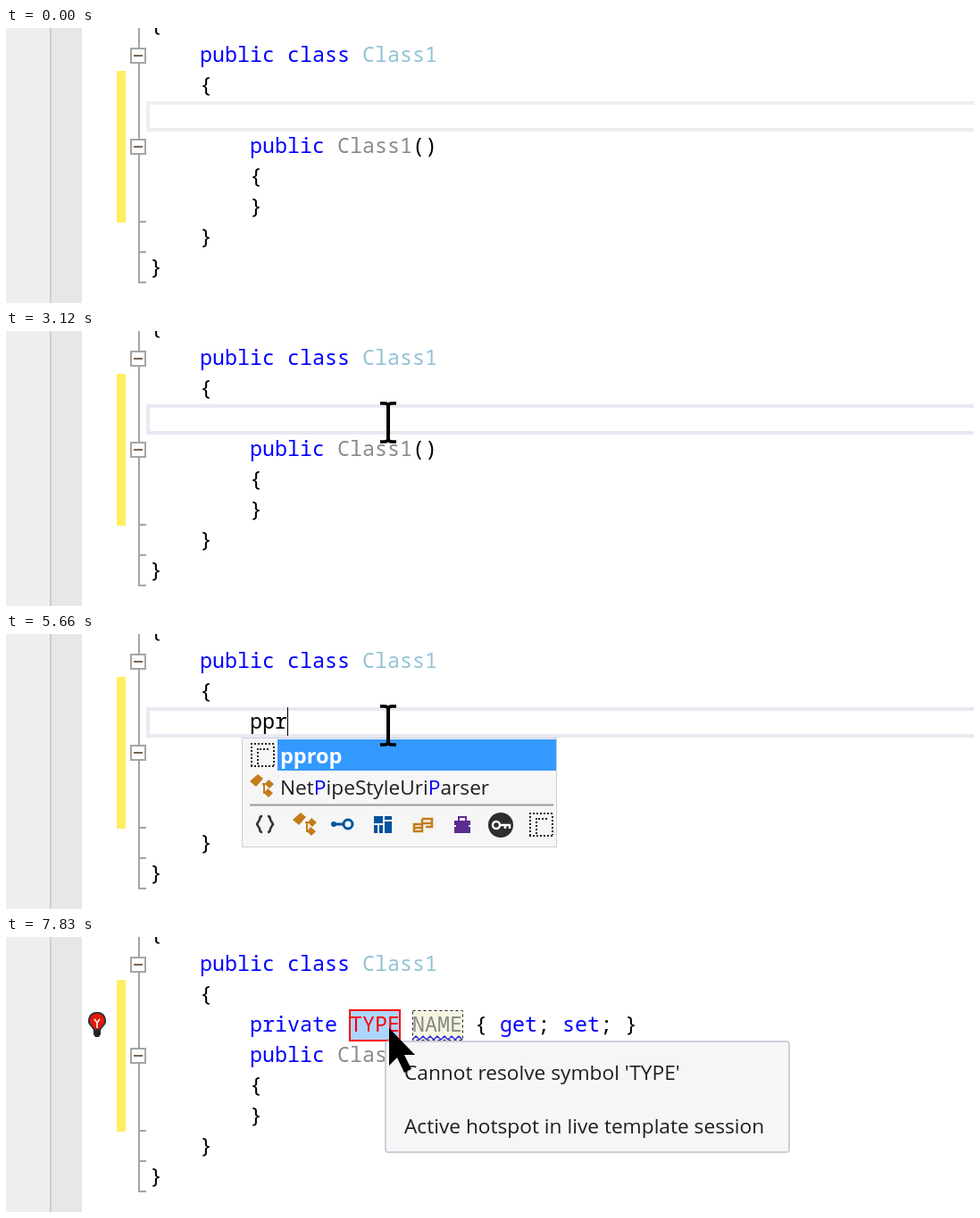
Animation, 1084 px wide and 308 px high, one loop 8000 ms. Source, as an HTML page:

```html
<!DOCTYPE html>
<html lang="en">
<head>
<meta charset="utf-8">
<title>Property template</title>
<style>
  html, body { margin: 0; width: 100%; height: 100%; overflow: hidden; background: #fff; }
  svg { display: block; width: 1084px; height: 308px; }
  text { white-space: pre; }
  .code { font: 23.33px "Noto Sans Mono", "DejaVu Sans Mono", monospace; }
  .ui { font: 22.7px "Open Sans", "Noto Sans", sans-serif; fill: #1e1e1e; }
  .pick { font-weight: 700; font-size: 23.5px; fill: #fff; }
  .kw { fill: #00f; }
  .type { fill: #93c2d6; }
  .dim { fill: #8a8a8a; }
  .in { fill: #717171; }
  .panel { fill: #f6f6f6; stroke: #cccedb; }
</style>
</head>
<body>
<svg viewBox="0 0 1084 308">
  <defs>
    <g id="snippet" fill="none" stroke="#222" stroke-width="2" stroke-dasharray="2 2">
      <path d="M0 1H27M0 26H27M1 4V25M26 4V25M8 6V24M10 7H20"/>
    </g>
    <g id="nodes" fill="#c27d1a">
      <path d="M14 11H20M16 11V21H20" fill="none" stroke="#c27d1a" stroke-width="2"/>
      <path d="M21 6L27 11L22 16L17 11ZM20 16L26 21L21 26L16 21Z"/>
    </g>
    <g id="class">
      <use href="#nodes"/>
      <path d="M9 0L15 5L7 14L0 8Z" fill="#c27d1a"/>
    </g>
    <g id="abstract">
      <use href="#nodes"/>
      <path d="M7 10L13 14L8 20L3 15Z" fill="#c27d1a"/>
      <path d="M1 9L5 0H6L10 9M3 6H8" fill="none" stroke="#222" stroke-width="2"/>
    </g>
  </defs>

  <!-- margins and outline -->
  <path fill="#eeeef0" d="M0 0H49V308H0Z"/>
  <path fill="#c9cdd9" d="M49 0H51V308H49Z"/>
  <path fill="#e6e8e8" d="M51 0H85V308H51Z"/>
  <path fill="#ffee62" d="M124 48H134V218H124Z"/>
  <rect id="line" x="159" y="84" width="940" height="30" fill="#fff" stroke="#eee" stroke-width="4"/>
  <g fill="none" stroke="#a5a5a5" stroke-width="2">
    <path d="M149 0V22M149 40V124M149 142V285H157M149 217H157M149 251H157"/>
    <path d="M140 23H156V39H140ZM140 125H156V141H140Z"/>
    <path d="M143 31H153M143 133H153" stroke="#7a6652"/>
  </g>

  <g class="code">
    <text x="161" y="4">{</text>
    <text x="217" y="38"><tspan class="kw">public class</tspan> <tspan class="type">Class1</tspan></text>
    <text x="217" y="72">{</text>
    <text x="273" y="140"><tspan class="kw">public</tspan> <tspan class="dim">Class1</tspan>()</text>
    <text x="273" y="174">{</text>
    <text x="273" y="208">}</text>
    <text x="217" y="242">}</text>
    <text x="161" y="276">}</text>
    <text id="key1" x="273" y="106">p</text>
    <text id="key2" x="287" y="106">p</text>
    <text id="key3" x="301" y="106">r</text>
  </g>

  <g id="hotspots">
    <rect x="385" y="82" width="56" height="34" fill="#add6ff" stroke="#f00" stroke-width="2"/>
    <rect x="455.5" y="82.5" width="56" height="33" fill="#f5f5e1" stroke="#222" stroke-dasharray="3 3"/>
    <path id="wave" fill="none" stroke="#3030e8" stroke-width="1.5"/>
  </g>
  <text id="prop" class="code" x="273" y="106"><tspan class="kw">private</tspan> <tspan fill="#f00">TYPE</tspan> <tspan class="dim">NAME</tspan> { <tspan class="kw">get</tspan>; <tspan class="kw">set</tspan>; }</text>
  <rect id="caret" y="82" width="1" height="32"/>

  <g id="bulb">
    <path d="M98 102H106V109L104 112H100L98 109Z" fill="#222"/>
    <path d="M102 85A8.5 8.5 0 0 1 108 100L105 104H99L96 100A8.5 8.5 0 0 1 102 85Z" fill="#e3170d" stroke="#333" stroke-width="2"/>
    <path d="M99 92L102 96L105 92M102 96V102" fill="none" stroke="#fff" stroke-width="1.5"/>
  </g>

  <!-- short list -->
  <g id="short">
    <rect class="panel" x="264.5" y="116.5" width="352" height="122"/>
    <path fill="#39f" d="M304 118H616V153H304Z"/>
    <use href="#snippet" x="274" y="122"/>
    <text class="ui pick" x="307" y="145">pprop</text>
    <use href="#class" x="273" y="157"/>
    <text class="ui" x="307" y="180">Net<tspan class="kw">P</tspan>ipeStyleUri<tspan class="kw">P</tspan>arser</text>
    <path d="M273 191.5H613" stroke="#999" stroke-width="2"/>
    <path d="M287 204Q284 204 284 208L281 213L284 218Q284 222 287 222M293 204Q296 204 296 208L299 213L296 218Q296 222 293 222" fill="none" stroke="#333" stroke-width="2.5"/>
    <use href="#class" x="321" y="200"/>
    <g fill="none" stroke="#00539c" stroke-width="3">
      <circle cx="383" cy="213" r="5"/>
      <path d="M378 213H368"/>
      <circle cx="367" cy="213" r="1.5"/>
    </g>
    <path fill="#00539c" d="M412 204H422V212H412ZM424 204H432V208H424ZM424 210H432V223H424ZM412 214H416V223H412ZM418 214H422V223H418Z"/>
    <path fill="none" stroke="#c27d1a" stroke-width="2.5" d="M466 207H477V216H470M466 207V212H477M457 213H466V221H457ZM457 217H466"/>
    <path fill="#5c2d91" d="M502 209H520V214H502ZM502 216H520V223H502ZM504 214H518V217H504Z"/>
    <path fill="none" stroke="#5c2d91" stroke-width="2" d="M507 209V205H515V209"/>
    <circle cx="554" cy="214" r="14" fill="#2d2d30"/>
    <g fill="none" stroke="#fff" stroke-width="2.5">
      <circle cx="549" cy="214" r="4"/>
      <path d="M553 214H564V218M559 214V218"/>
    </g>
    <use href="#snippet" x="586" y="200"/>
  </g>

  <!-- long list -->
  <g id="long">
    <rect class="panel" x="264.5" y="116.5" width="806" height="240"/>
    <path fill="#39f" d="M304 118H1036V153H304Z"/>
    <use href="#snippet" x="274" y="122"/>
    <text class="ui pick" x="307" y="145">pprop</text>
    <path fill="#e8e8ec" d="M1037 118H1070V308H1037Z"/>
    <path fill="#c2c3c9" d="M1045 153H1062V308H1045Z"/>
    <path fill="#62649c" d="M1044 141L1053.5 131L1063 141Z"/>
  </g>

  <g id="tip">
    <rect class="panel" x="425" y="117" width="452" height="124" rx="3" stroke-width="2"/>
    <text class="ui" x="446" y="160">Cannot resolve symbol 'TYPE'</text>
    <text class="ui" x="446" y="220">Active hotspot in live template session</text>
  </g>

  <g id="beam">
    <path d="M-9 -21H-4Q0 -21 0 -17Q0 -21 4 -21H9M-9 22H-4Q0 22 0 18Q0 22 4 22H9" fill="none" stroke="#000" stroke-width="3.5"/>
    <path d="M0 -19V20" stroke="#000" stroke-width="4"/>
  </g>
  <path id="arrow" d="M429 102V144L438 135L446 152L454 148L446 132H458Z"/>
</svg>

<script>
const LOOP = 8000;
const $ = id => document.getElementById(id);

// Entries of the long list; *…* marks the matched letters.
const entries = [
  ["class", "Contract*P*ublic*Pr*opertyNameAttribute", "System.Diagnostics.Contr..."],
  ["class", "Db*P*roviderSpecificType*Pr*opertyAttribute", "System.Data.Common)"],
  ["class", "Extender*P*rovided*Pr*opertyAttribute", "System.ComponentModel)"],
  ["abstract", "I*P*v4Interface*Pr*operties", "System.Net.NetworkInformation)"],
  ["abstract", "I*P*v6Interface*Pr*operties", "System.Net.NetworkInformation)"]
];
$("long").insertAdjacentHTML("beforeend", entries.map(([icon, name, space], i) => {
  const y = 180 + 35 * i;
  const label = name.replace(/\*(\w+)\*/g, '<tspan class="kw">$1</tspan>');
  return `<use href="#${icon}" x="273" y="${y - 23}"/>
    <text class="ui" x="307" y="${y}">${label}<tspan class="in"> (in ${space}</tspan></text>`;
}).join(""));

let wave = "M455 115";
for (let x = 459, up = true; x <= 511; x += 4, up = !up) wave += `L${x} ${up ? 111 : 115}`;
$("wave").setAttribute("d", wave);

// Plays [time, value] steps that hold until the next one.
function play(id, prop, steps) {
  const frames = steps.map(([t, v]) => ({ offset: t / LOOP, [prop]: v, easing: "step-end" }));
  frames.push({ offset: 1, [prop]: steps[steps.length - 1][1] });
  $(id).animate(frames, { duration: LOOP, iterations: Infinity });
}

const fades = {
  line: [[0, 1], [6620, 0]],
  key1: [[0, 0], [5260, 1], [6620, 0]],
  key2: [[0, 0], [5350, 1], [6620, 0]],
  key3: [[0, 0], [5660, 1], [6620, 0]],
  caret: [[0, 0], [950, 1], [3120, 0], [5260, 1], [7830, 0]],
  short: [[0, 0], [5430, .4], [5510, .75], [5590, 1], [5740, 0]],
  long: [[0, 0], [5740, .7], [5820, 1], [6620, 0]],
  prop: [[0, 0], [6620, 1]],
  hotspots: [[0, 0], [6690, 1]],
  tip: [[0, 0], [6990, .6], [7080, 1]],
  bulb: [[0, 0], [7080, 1]],
  beam: [[0, 0], [320, 1], [6770, 0]],
  arrow: [[0, 0], [6770, 1]]
};
for (const id in fades) play(id, "opacity", fades[id]);

const at = (x, y = 0) => `translate(${x}px, ${y}px)`;
play("line", "stroke", [[0, "#eeeeee"], [950, "#e9e9f2"]]);
play("caret", "transform",
  [[0, 273], [5260, 287], [5350, 301], [5660, 315], [6620, 441]].map(([t, x]) => [t, at(x)]));

// The pointer glides in from the lower right and slows down.
const glide = [[0, at(1020, 240)]];
for (let i = 0; i < 8; i++) {
  const rest = (1 - i / 7) ** 2;
  glide.push([320 + 75 * i, at(Math.round(428 + 592 * rest), Math.round(102 + 138 * rest))]);
}
play("beam", "transform", glide);
</script>
</body>
</html>
```
